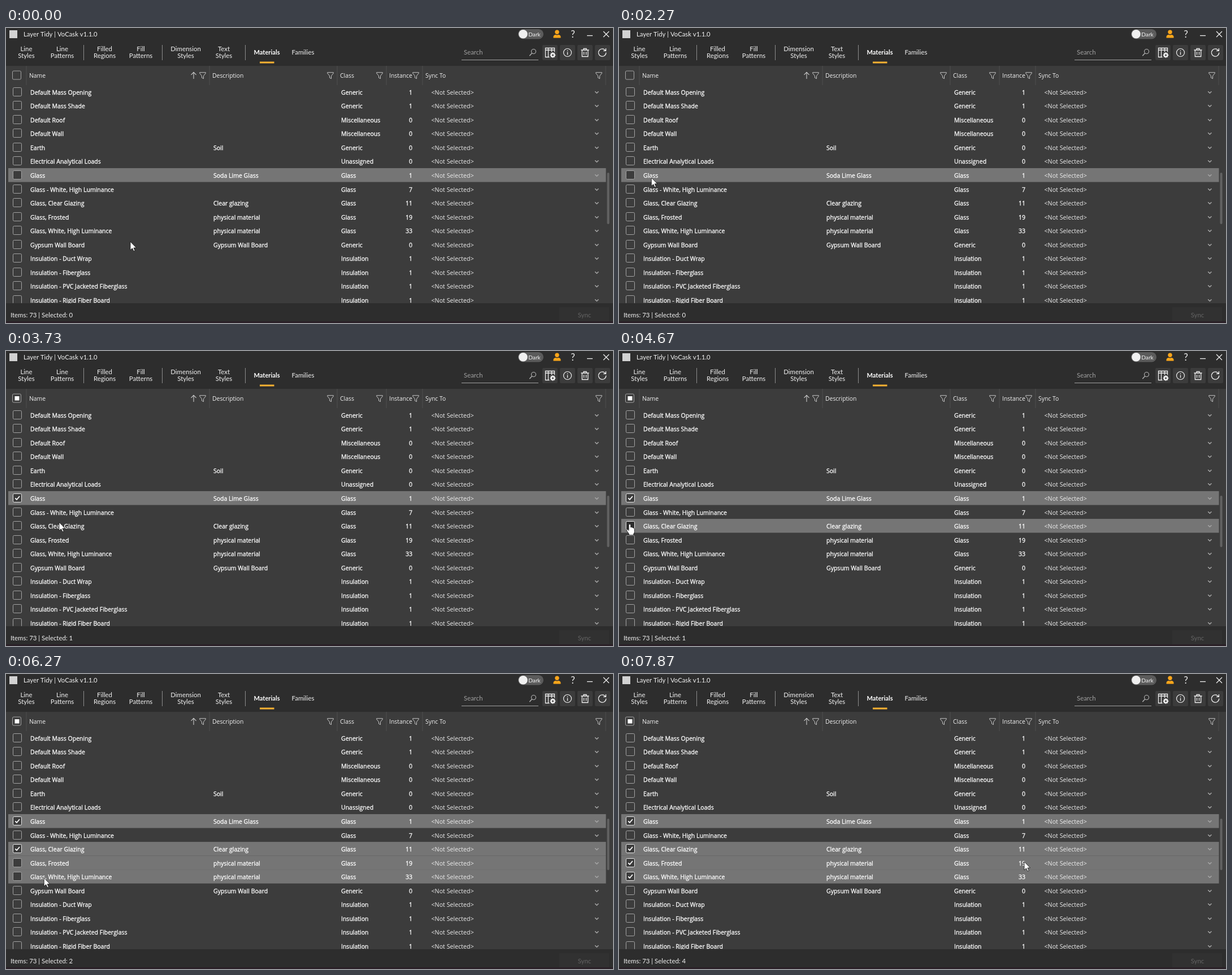
Animation, 1074 px wide and 522 px high, one loop 8000 ms. Source, as an HTML page with a canvas:

```html
<!DOCTYPE html>
<html lang="en">
<head>
<meta charset="utf-8">
<title>Materials</title>
<style>
html, body { margin: 0; width: 100%; height: 100%; overflow: hidden; background: #2d2d2d; }
canvas { display: block; }
</style>
</head>
<body>
<canvas id="stage" width="1074" height="522"></canvas>
<script>
const ctx = document.getElementById('stage').getContext('2d');
const LOOP = 8000, STEP = 200 / 3, ROW_H = 24.53;
const BODY = '"Open Sans", "Noto Sans", sans-serif', HEAD = 'Lato, sans-serif';
const BAR = '#2d2d2d', PANEL = '#3c3c3c', PICKED = '#757575', ORANGE = '#f9a51a', INK = '#f0f0f0';

const rows = [
  ['Default Mass Opening', '', 'Generic', 1],
  ['Default Mass Shade', '', 'Generic', 1],
  ['Default Roof', '', 'Miscellaneous', 0],
  ['Default Wall', '', 'Miscellaneous', 0],
  ['Earth', 'Soil', 'Generic', 0],
  ['Electrical Analytical Loads', '', 'Unassigned', 0],
  ['Glass', 'Soda Lime Glass', 'Glass', 1],
  ['Glass - White, High Luminance', '', 'Glass', 7],
  ['Glass, Clear Glazing', 'Clear glazing', 'Glass', 11],
  ['Glass, Frosted', 'physical material', 'Glass', 19],
  ['Glass, White, High Luminance', 'physical material', 'Glass', 33],
  ['Gypsum Wall Board', 'Gypsum Wall Board', 'Generic', 0],
  ['Insulation - Duct Wrap', '', 'Insulation', 1],
  ['Insulation - Fiberglass', '', 'Insulation', 1],
  ['Insulation - PVC Jacketed Fiberglass', '', 'Insulation', 1],
  ['Insulation - Rigid Fiber Board', '', 'Insulation', 1]
];

// Column label and left edge; each column ends where the next begins
const columns = [['Name', 36], ['Description', 360], ['Class', 586], ['Instance', 673], ['Sync To', 737], ['', 1061]];
const left = columns.map(c => c[1]);

// Row index -> time of highlight and of tick
const pickedAt = { 6: 0, 8: 4000, 9: 6267, 10: 6267 };
const tickedAt = { 6: 2800, 8: 4733, 9: 6933, 10: 6933 };

// Pointer moves: start, duration, goal; the pointer rests in between
const smooth = k => k * k * (3 - 2 * k), speedUp = k => k * k;
const home = { x: 220, y: 378 };
const moves = [
  { at: 0, dur: 600, x: 4, y: 260 },
  { at: 600, dur: 300, x: 88, y: 268 },
  { at: 900, dur: 233, x: 72, y: 267 },
  { at: 1267, dur: 267, x: 59, y: 265 },
  { at: 2230, dur: 300, x: 19, y: 260 },
  { at: 2867, dur: 800, x: 94, y: 303 },
  { at: 4267, dur: 333, x: 19, y: 306 },
  { at: 4800, dur: 533, x: 111, y: 387 },
  { at: 5400, dur: 200, x: 106, y: 390 },
  { at: 5600, dur: 467, x: 83, y: 361 },
  { at: 6130, dur: 400, x: 25, y: 360 },
  { at: 6600, dur: 133, x: 19, y: 359 },
  { at: 6933, dur: 900, x: 717, y: 332, ease: speedUp, lift: 36 }
];

function pointerAt(t) {
  let { x, y } = home;
  for (const m of moves) {
    if (t < m.at) break;
    const k = (m.ease || smooth)(Math.min(1, (t - m.at) / m.dur));
    x += (m.x - x) * k;
    y += (m.y - y) * k - (m.lift || 0) * Math.sin(Math.PI * k);
  }
  return [x, y];
}

const rowTop = i => 100.8 + ROW_H * i;
const boxTop = i => Math.round(rowTop(i) + 4);
const overBox = (x, y, top) => x >= 12 && x <= 28 && y >= top && y <= top + 16;

function text(str, x, y, { size = 10.4, font = BODY, color = '#f2f2f2', align = 'left', weight = 400, firm = false } = {}) {
  ctx.font = `${weight} ${size}px ${font}`;
  ctx.textAlign = align;
  ctx.fillStyle = ctx.strokeStyle = color;
  ctx.fillText(str, x, y);
  if (firm) {
    ctx.lineWidth = .3;
    ctx.strokeText(str, x, y);
  }
}

function head(str, x, y, opts) {
  text(str, x, y, { size: 11.4, font: HEAD, ...opts });
}

function box(x, y, w, h, color) {
  ctx.fillStyle = color;
  ctx.fillRect(x, y, w, h);
}

function paint(path, fill, stroke, width) {
  if (fill) { ctx.fillStyle = fill; ctx.fill(path); }
  if (stroke) { ctx.strokeStyle = stroke; ctx.lineWidth = width; ctx.stroke(path); }
}

function pill(x, y, w, h, r, fill, stroke) {
  const p = new Path2D();
  p.roundRect(x, y, w, h, r);
  paint(p, fill, stroke, 1);
}

function dot(x, y, r, fill, stroke, width) {
  const p = new Path2D();
  p.arc(x, y, r, 0, 7);
  paint(p, fill, stroke, width);
}

// Draws SVG path data at an offset
function shape(d, x, y, fill, stroke, width) {
  ctx.save();
  ctx.translate(x, y);
  paint(new Path2D(d), fill, stroke, width);
  ctx.restore();
}

const line = (d, x, y, color = INK, width = 1.3) => shape(d, x, y, null, color, width);

function titleBar() {
  box(6, 4, 14, 14, '#d2d2d2');
  head('Layer Tidy | VoCask v1.1.0', 31, 15, { size: 11.3 });
  pill(906, 2, 45, 17.5, 9, '#5b5b5b');
  dot(915, 10.8, 7.8, INK);
  head('Dark', 935, 14.5, { size: 10.2, align: 'center' });
  dot(975, 7.3, 3.7, ORANGE);
  shape('M-6.5 7.5V5.5Q-6 2.5-2.5 1.8Q0 3.2 2.5 1.8Q6 2.5 6.5 5.5V7.5Z', 975, 10, ORANGE);
  head('?', 1003, 17, { size: 17, align: 'center' });
  line('M-5 0H5', 1033, 13.5);
  line('M-5-5L5 5M5-5L-5 5', 1062, 11);
}

function toolbar() {
  const tabs = [['Line', 'Styles', 36], ['Line', 'Patterns', 99.5], ['Filled', 'Regions', 174.5],
    ['Fill', 'Patterns', 238.5], ['Dimension', 'Styles', 318], ['Text', 'Styles', 385.5]];
  for (const [a, b, x] of tabs) {
    head(a, x, 41, { align: 'center' });
    head(b, x, 53, { align: 'center' });
  }
  for (const x of [137, 276, 423]) box(x, 30, 1, 27, '#8c8c8c');
  head('Materials', 461.5, 47, { align: 'center', weight: 700, size: 11.1, color: '#fff' });
  head('Families', 525.5, 47, { align: 'center' });
  box(449, 59.5, 25.5, 3, '#fbb232');

  head('Search', 810, 47, { color: '#a0a0a0' });
  box(806, 56, 136, 1, '#a0a0a0');
  dot(933.5, 41.5, 4, null, '#b5b5b5', 1.1);
  line('M-4.5 5L0 0', 930.8, 44.3, '#b5b5b5');

  for (let i = 0; i < 4; i++) pill(949 + 31 * i, 30, 27, 27, 2, PANEL);
  line('M-1 8H-8V-8H8V-1M-8-4.5H8M-3-8V8M3-8V-1', 962.5, 43.5);
  dot(967.5, 48, 3, null, INK, 2);
  line('M0-5V5M-5 0H5M-3.5-3.5L3.5 3.5M3.5-3.5L-3.5 3.5', 967.5, 48);
  dot(967.5, 48, 1.5, PANEL);
  dot(993.5, 43.5, 7, null, INK, 1.2);
  line('M0-1V4M0-4V-2.5', 993.5, 43.5);
  line('M-7-4.5H7M-2.5-4.5V-7H2.5V-4.5M-5.2-4.5V7H5.2V-4.5M-2-1.5V4M2-1.5V4', 1024.5, 43.5);
  line('M5.6-3.6A6.7 6.7 0 1 0 6.7 0M6.4-7.5V-3.2H2', 1055, 43.5);
}

function checkbox(x, y, { on, hover } = {}) {
  pill(x + .5, y + .5, 15, 15, 2, hover ? '#2c2c2c' : PANEL, on || hover ? '#e8e8e8' : '#a4a4a4');
  if (on) line('M4.3 8.3L7 11L12 5', x, y, '#fff', 1.8);
}

function tableHead(some) {
  checkbox(11, 75.5);
  if (some) box(15.5, 80, 8, 7.5, '#fff');
  columns.forEach(([label, x], i) => {
    box(x - .5, 67, 1, 34, '#4e4e4e');
    text(label, x + 5, 88);
    if (i) line('M-5.3-5.3H5.3V-4L1.5 .8V5.6L-1.5 4V.8L-5.3-4Z', x - 12, 84, '#c4c4c4', 1);
  });
  line('M0 6V-5.5M-4.5-1.2L0-5.7L4.5-1.2', 332, 84, '#ccc', 1.1);
}

function table(t, px, py) {
  const cell = { size: 10.5, color: '#fff', firm: true };
  ctx.save();
  ctx.beginPath();
  ctx.rect(0, 101, 1074, 386);
  ctx.clip();
  rows.forEach(([name, note, kind, count], i) => {
    const y = Math.round(rowTop(i) + 17), picked = t >= pickedAt[i];
    if (picked) box(4, rowTop(i), 1057.5, ROW_H, PICKED);
    checkbox(12, boxTop(i), { on: t >= tickedAt[i], hover: overBox(px, py, boxTop(i)) });
    [name, note, kind].forEach((s, c) => text(s, left[c] + 7, y, cell));
    text(count, left[4] - 18, y, { ...cell, align: 'right' });
    text('<Not Selected>', left[4] + 15.5, y, { size: 10.7, color: '#ececec' });
    line('M-3.1-1.5L0 1.5L3.1-1.5', 1045.3, y - 4.3, '#a6a6a6', 1.6);
  });
  ctx.restore();
  pill(1063.5, 256, 4, 91, 2, '#626262');
}

function statusBar(count) {
  box(0, 487, 1074, 32, BAR);
  box(0, 519, 1074, 3, '#2a2027');
  head(`Items: 73 | Selected: ${count}`, 8, 512);
  box(979, 494, 88, 25, '#313131');
  head('Sync', 1023.5, 512, { align: 'center', color: '#646464' });
}

function pointer(x, y) {
  const arrow = 'M0 0V15L3.5 11.8L6 17L8.2 16L5.9 11H10.5Z';
  const hand = 'M-1.8 1.5Q0-1 1.8 1.5V6Q4.2 4.8 4.6 6.6Q6.4 5.8 6.6 7.4Q8.5 6.8 8.5 9V13.5' +
    'Q8.4 16 6.8 17.5V19.8H-1.2V17.8L-5 12.5Q-5.6 9.2-3.6 10L-1.8 11.6Z';
  const onBox = rows.some((_, i) => overBox(x, y, boxTop(i)));
  shape(onBox ? hand : arrow, x, y, '#fff', '#111', .8);
}

function draw(now) {
  // The picture advances 15 times a second
  const t = Math.floor((now % LOOP + 4) / STEP) * STEP % LOOP + .5;
  const [x, y] = pointerAt(t);
  const count = Object.values(tickedAt).filter(at => t >= at).length;
  box(0, 0, 1074, 522, BAR);
  box(0, 67, 1074, 420, PANEL);
  titleBar();
  toolbar();
  tableHead(count > 0);
  table(t, x, y);
  statusBar(count);
  pointer(x, y);
}

const start = performance.now();
function tick() {
  draw(performance.now() - start);
  requestAnimationFrame(tick);
}
tick();
</script>
</body>
</html>
```
